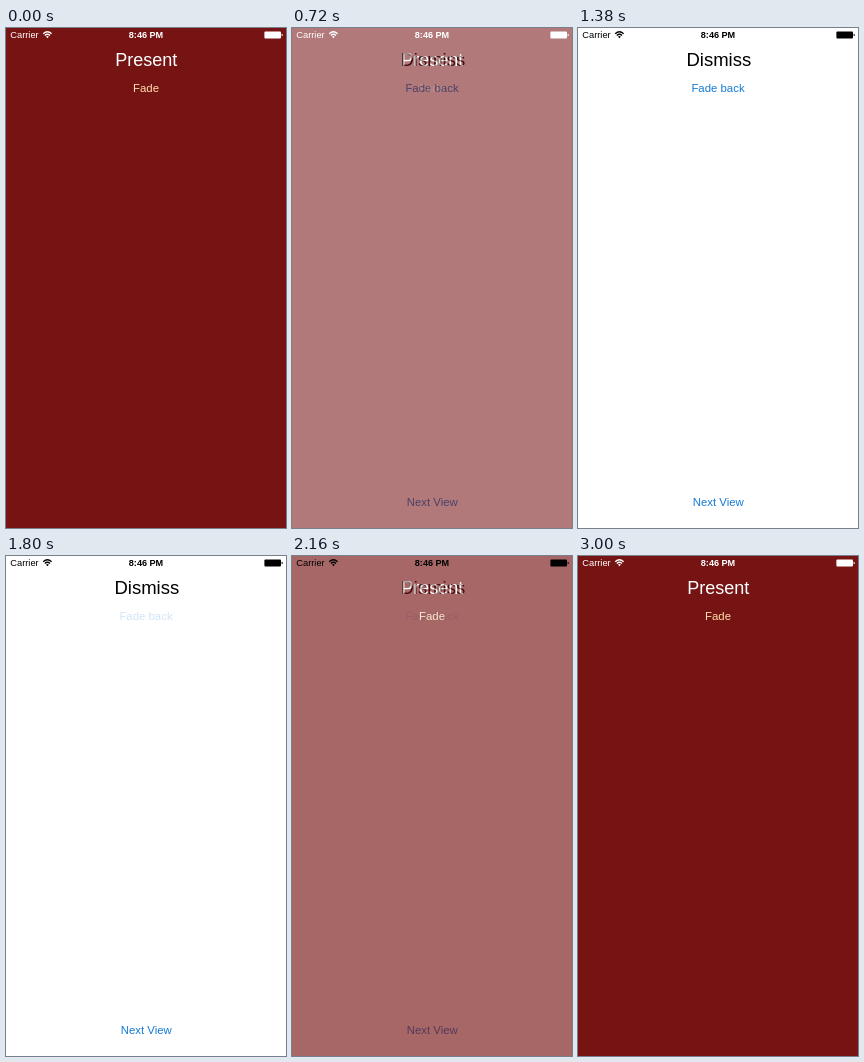
Recreate the animation shown at these times as an HTML page. Size 280x500 px, loop 3180 ms.

```html
<!DOCTYPE html>
<html lang="en">
<head>
<meta charset="utf-8">
<title>Fade transition</title>
<style>
  html, body { margin: 0; width: 100%; height: 100%; overflow: hidden; background: #761414; }
  svg { display: block; width: 280px; height: 500px; }
  text { font: 11.4px "Liberation Sans", Arial, sans-serif; text-anchor: middle; }

  .title { font-size: 18px; }
  #dismiss .title { font-size: 18.5px; }
  .link { fill: #147ad6; }
  .cream { fill: #ffdfae; }

  #status text { font-size: 9.3px; text-anchor: start; fill: currentColor; }
  #status .clock { font-size: 9.1px; font-weight: bold; text-anchor: middle; }

  #dismiss, #status, #fade, #back { animation: 3180ms infinite; }
  #dismiss { animation-name: cover; }
  #status { animation-name: tint; animation-timing-function: step-end; }
  #fade { animation-name: press-fade; animation-timing-function: step-end; }
  #back { animation-name: press-back; animation-timing-function: step-end; }

  @keyframes cover {
    0% { opacity: 0; animation-timing-function: linear; }
    15.72% { opacity: 0; animation-timing-function: ease-in-out; }
    30.82% { opacity: 1; animation-timing-function: linear; }
    60.06% { opacity: 1; animation-timing-function: ease-in-out; }
    73.58%, 100% { opacity: 0; }
  }
  @keyframes tint {
    0% { color: #fff; }
    29.9% { color: #000; }
    75.16%, 100% { color: #fff; }
  }
  @keyframes press-fade {
    0% { opacity: 1; }
    13.2% { opacity: .2; }
    40%, 100% { opacity: 1; }
  }
  @keyframes press-back {
    0% { opacity: 1; }
    56.3% { opacity: .2; }
    90%, 100% { opacity: 1; }
  }
</style>
</head>
<body>
<svg viewBox="0 0 280 500">
  <g id="present">
    <rect width="280" height="500" fill="#761414"/>
    <text class="title" x="140.2" y="37.8" fill="#fff">Present</text>
    <text id="fade" class="cream" x="140" y="64">Fade</text>
  </g>

  <g id="dismiss">
    <rect width="280" height="500" fill="#fff"/>
    <text class="title" x="140.8" y="38.4" fill="#000">Dismiss</text>
    <text id="back" class="link" x="140" y="64.4">Fade back</text>
    <text class="link" x="140.3" y="478">Next View</text>
  </g>

  <g id="status">
    <text x="4.3" y="10.3">Carrier</text>
    <g fill="none" stroke="currentColor" stroke-width="1.3">
      <path d="M37.2 5.7Q41.4 1.9 45.6 5.7"/>
      <path d="M38.8 7.5Q41.4 5.1 44 7.5"/>
    </g>
    <path d="M40 8.7Q41.4 7.5 42.8 8.7L41.4 10.3Z" fill="currentColor"/>
    <text class="clock" x="140" y="10.3">8:46 PM</text>
    <rect x="258.4" y="3.6" width="16.6" height="6.8" rx="1" fill="currentColor"/>
    <path d="M275.6 5.8Q276.9 6 276.9 7T275.6 8.2Z" fill="currentColor"/>
  </g>
</svg>
</body>
</html>
```
